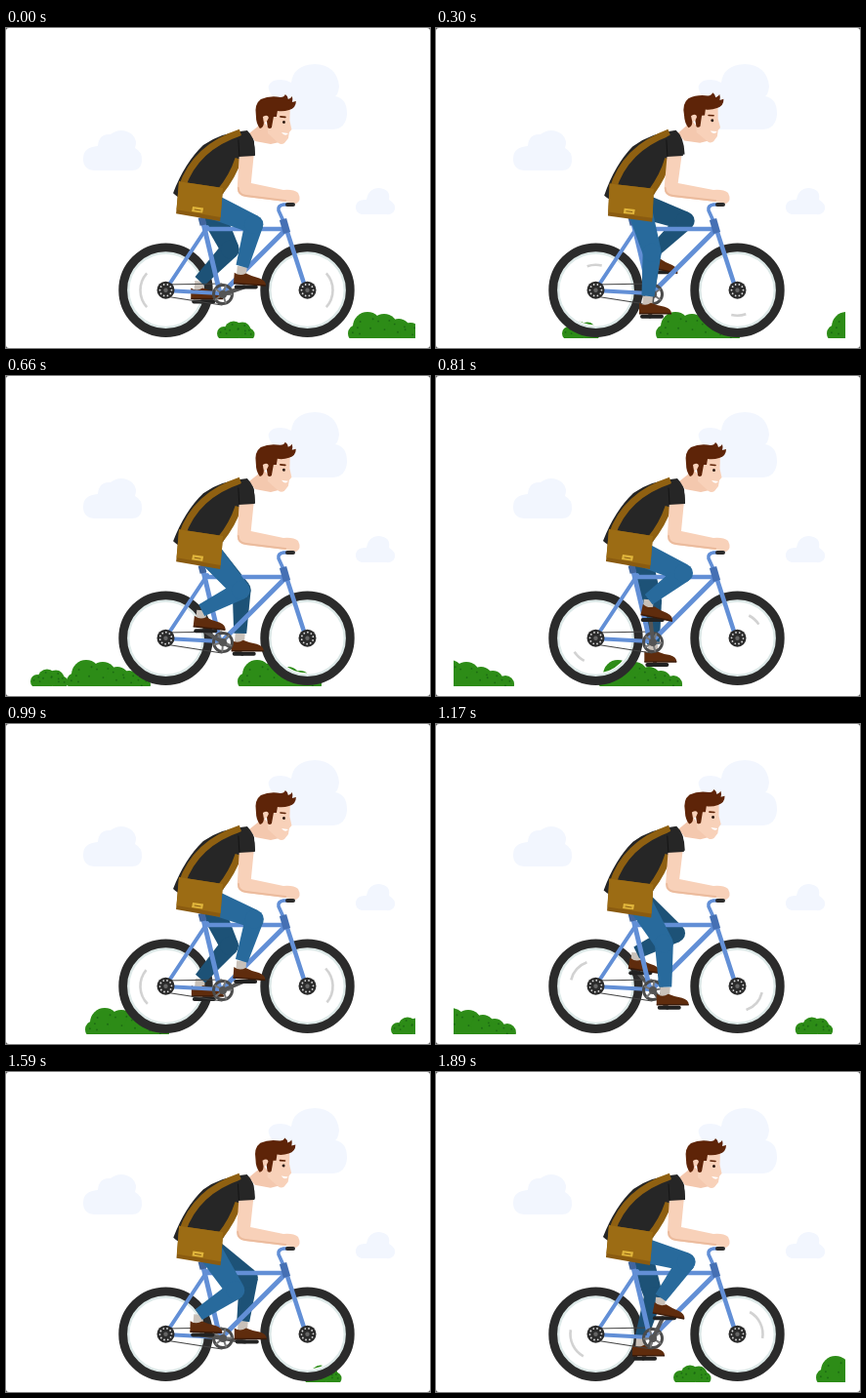
Animation, 434 px wide and 328 px high, one loop 1.92 s. Source, as an HTML page with a canvas:

```html
<!DOCTYPE html>
<html>
<head>
<meta charset="utf-8">
<style>
html, body { margin: 0; width: 434px; height: 328px; overflow: hidden; background: #555; }
canvas { display: block; }
</style>
</head>
<body>
<canvas id="stage" width="434" height="328"></canvas>
<script>
const g = document.getElementById('stage').getContext('2d');
const RAD = Math.PI / 180;
const LOOP = 1920, STEP = 30, TURN = 1000;
const HIP = [207, 181], CRANK = [222, 273], CRANK_LEN = 23;
const REAR = [163.5, 268.7], FRONT = [308.5, 268.7];
const BLUE = '#628fd6', DARK = '#2b2b2b', SKIN = '#f8d1b9', BROWN = '#8f6011';

function fill(d, color) {
  g.fillStyle = color;
  g.fill(new Path2D(d));
}

function line(d, color, width, cap = 'round') {
  g.strokeStyle = color;
  g.lineWidth = width;
  g.lineCap = cap;
  g.lineJoin = 'round';
  g.stroke(new Path2D(d));
}

function disc(x, y, r, color) {
  g.fillStyle = color;
  g.beginPath();
  g.arc(x, y, r, 0, 7);
  g.fill();
}

function ring(x, y, r, color, width, from = 0, to = 2 * Math.PI) {
  g.strokeStyle = color;
  g.lineWidth = width;
  g.lineCap = 'butt';
  g.beginPath();
  g.arc(x, y, r, from, to);
  g.stroke();
}

// Limb that narrows from radius ra to rb
function taper([ax, ay], ra, [bx, by], rb, color) {
  const a = Math.atan2(by - ay, bx - ax), nx = -Math.sin(a), ny = Math.cos(a);
  fill(`M${ax + nx * ra},${ay + ny * ra}L${bx + nx * rb},${by + ny * rb}
    L${bx - nx * rb},${by - ny * rb}L${ax - nx * ra},${ay - ny * ra}Z`, color);
  disc(ax, ay, ra, color);
}

// Piecewise path through [time, x] points, extended at both ends
function along(points, t) {
  let i = 1;
  while (i < points.length - 1 && t > points[i][0]) i++;
  const [t0, x0] = points[i - 1], [t1, x1] = points[i];
  return x0 + (x1 - x0) * (t - t0) / (t1 - t0);
}

function clouds() {
  const c = '#f2f6fe';
  fill('M284,104Q267,103 267,89Q267,78 277,74Q262,60 274,54Q284,51 292,56Q294,38 316,37Q339,38 341,60Q340,68 337,70Q349,72 349,88Q348,103 335,104Z', c);
  fill('M90,146Q79,145 79,134Q79,122 94,121Q95,108 107,109Q118,101 129,109Q135,115 132,123Q140,127 139,137Q138,146 129,146Z', c);
  fill('M364,191Q357,189 358,182Q360,175 369,176Q371,164 382,164Q394,165 392,176Q399,180 398,186Q396,192 389,191Z', c);
}

function bush(x, parts) {
  g.save();
  g.beginPath();
  g.rect(18, 280, 401, 38);
  g.clip();
  for (const [dx, y, r] of parts) disc(x + dx, y, r, '#2d8c17');
  for (const [dx, y, r] of parts)
    for (let k = 0; k < 3; k++)
      disc(x + dx + r * .5 * Math.cos(k * 2.2 + dx), y - r * .25 + r * .4 * Math.sin(k * 2.2 + dx), .9, '#1c6a14');
  g.restore();
}

const SMALL = [[7, 313, 7], [17, 310, 9.5], [26, 310, 8.5], [32, 314, 6.5]];
const LARGE = [[9, 313, 9], [20, 306, 15], [37, 307, 14], [52, 310, 12], [64, 313, 11], [77, 316, 9]];

function bushes(t) {
  const wrap = start => t < start ? t + 2000 : t;
  bush(along([[990, 394], [1380, 337], [1590, 305], [1890, 243], [2000, 216], [2300, 129], [2660, 25]], wrap(800)), SMALL);
  bush(along([[1890, 389], [2000, 350], [2300, 225], [2660, 62]], wrap(1300)), LARGE);
  bush(along([[300, 400], [660, 237], [990, 81]], t), LARGE);
}

function wheel([x, y], shine, phase) {
  ring(x, y, 37.8, '#fff', 4);
  ring(x, y, 38.3, '#dde9e8', 2.6);
  ring(x, y, 43.8, DARK, 8.8);
  const half = 42 * Math.min(1, Math.max(0, 1 - phase / 180, (phase - 270) / 60));
  const mid = shine + phase - 22 * Math.sin(phase * RAD);
  if (half) ring(x, y, 26, '#d2d2d2', 2.6, (mid - half) * RAD, (mid + half) * RAD);
}

function hub([x, y], phase) {
  disc(x, y, 9, DARK);
  for (let k = 0; k < 10; k++) {
    const a = (k * 36 + phase) * RAD;
    disc(x + 6 * Math.cos(a), y + 6 * Math.sin(a), .9, '#ddd');
  }
  disc(x, y, 2.2, '#666');
}

function pedalAt(angle) {
  return [CRANK[0] + CRANK_LEN * Math.cos(angle * RAD), CRANK[1] + CRANK_LEN * Math.sin(angle * RAD)];
}

function crankArm(angle) {
  const [x, y] = pedalAt(angle);
  line(`M${CRANK}L${x},${y}`, '#555', 4);
}

function leg(angle, color) {
  const [crankX, py] = pedalAt(angle);
  const px = crankX + 2;
  const ankle = [px - 4, py - 21];
  const thigh = 51, shin = 45;
  const dx = ankle[0] - HIP[0], dy = ankle[1] - HIP[1];
  const d = Math.min(Math.hypot(dx, dy), thigh + shin - .1);
  const bend = Math.acos((thigh * thigh + d * d - shin * shin) / (2 * thigh * d));
  const a = Math.atan2(dy, dx) - bend;
  const knee = [HIP[0] + thigh * Math.cos(a), HIP[1] + thigh * Math.sin(a)];

  line(`M${px - 10},${py}H${px + 10}`, '#222', 4);
  line(`M${ankle}L${px - 5},${py - 9}`, '#c9c1b9', 10, 'butt');
  g.save();
  g.translate(px, py);
  g.rotate(12 * Math.max(0, -Math.sin(angle * RAD)) * RAD);
  fill('M-13,-14Q-7,-10 -1,-14Q6,-11 13,-10Q20,-8 20,-3H-13Z', '#5f2c0d');
  line('M-13,-3H20', '#3a1a08', 1.5, 'butt');
  g.restore();
  taper(HIP, 13, knee, 9.5, color);
  taper(knee, 9.5, ankle, 6.5, color);
}

function frame(phase) {
  line('M163,263L221,262M163,275L221,284', '#444', 1.2);
  line('M201,196L219,272', BLUE, 5);
  line('M206,204L163,269L219,272', BLUE, 4);
  line('M205,206H286', BLUE, 4.5);
  line('M284,209L221,272', BLUE, 5);
  line('M285,200L307,268', BLUE, 4.5);
  line('M284,198L279,187Q278,182 284,181H290', BLUE, 3.6);
  line('M283.5,196L287.5,210', '#4570b4', 7.5, 'butt');
  line('M200,194L202,202', '#41659e', 7, 'butt');
  hub(REAR, phase);
  hub(FRONT, phase);
}

function chainring(phase) {
  const [x, y] = CRANK;
  ring(x, y, 9.5, '#4b4b4b', 3);
  for (let k = 0; k < 5; k++) {
    const a = (k * 72 + phase) * RAD;
    line(`M${x},${y}L${x + 9 * Math.cos(a)},${y + 9 * Math.sin(a)}`, '#777', 2);
  }
  disc(x, y, 4, '#555');
}

function head() {
  fill('M249,108L264,96L280,117L271,119L255,116Z', '#f4c8ae');
  fill('M267,80L291,80L290.5,95L292.5,104L290,107L289,113L285,118Q282,120 279,118L268,108Z', SKIN);
  fill('M256,90Q254,78 261,73Q270,69 281,71Q285,71 286,68Q289,70 289,73Q292,72 293,70Q294,73 293,76L297,75Q297,82 290,84Q284,86 278,85L277,91L274,91L272,102Q270,104 268,102L267,95L264,97Q264,102 260,103Q256,98 256,90Z', '#5e2408');
  fill('M264,97L263,91Q268,88 269,92L267,96Z', SKIN);
  line('M281,91L286,91.5', '#5e2408', 1.6);
  disc(284.5, 96.5, 1.5, '#2c1a12');
  fill('M282,107L289,108Q286,112 282,107Z', '#fff');
}

function body(bob) {
  g.save();
  g.translate(215, 140 + bob);
  g.rotate(-2.3 * bob * RAD);
  g.translate(-215, -140);
  head();
  fill('M247,105Q220,107 202,120Q183,138 171,169Q176,174 186,178L222,170L237,138L243,131L255,130Q255,112 247,105Z', '#262626');
  line('M180,163Q194,122 240,107', BROWN, 7, 'butt');
  line('M238,134Q232,152 219,168', BROWN, 7, 'butt');
  fill('M177,157L222,164L219,198L174,190Z', '#8a5b10');
  fill('M177,157L222,164L219.5,194L174.5,186Z', '#9c6c14');
  fill('M191,183L202,184.5L201,189.5L190,188Z', '#e0b53b');
  line('M193,186L199,187', '#8b5d12', 1);
  g.restore();
}

function arm(bob) {
  const s = -2.2 * bob, e = -3.4 * bob;
  fill(`M${239 + s},128L${254 + s},128L${251 + e},159L284,166Q294,165 299,169Q303,177 297,180L286,178
    L${245 + e},173Q${237 + e},172 ${237 + e},163Z`, SKIN);
  line(`M${238 + e},164Q${238 + e},171 ${246 + e},172L286,177`, '#ebbb9d', 2);
  fill(`M${238 + s},112Q${250 + s},104 ${254 + s},116L${255 + s},131L${238 + s},132Z`, '#262626');
  line(`M${238 + s},115L${239 + s},131`, '#151515', 1);
  line('M288,181H294', DARK, 4);
}

function draw(t) {
  const phase = t % TURN / TURN * 360;
  const near = phase - 19 + 9 * Math.sin(phase * RAD);
  const bob = ((1 + Math.cos((t - 340) / TURN * 2 * Math.PI)) / 2) ** 2;
  g.clearRect(0, 0, 434, 328);
  g.fillStyle = '#fff';
  g.beginPath();
  g.roundRect(0, 0, 434, 328, 3);
  g.fill();
  clouds();
  bushes(t);
  wheel(REAR, 180, phase);
  wheel(FRONT, 0, phase);
  crankArm(near + 180);
  leg(near + 180, '#1d5277');
  frame(phase);
  chainring(phase);
  crankArm(near);
  leg(near, '#286a9c');
  body(bob);
  arm(bob);
}

function tick(now) {
  draw(Math.floor(now % LOOP / STEP) * STEP);
  requestAnimationFrame(tick);
}
draw(0);
requestAnimationFrame(tick);
</script>
</body>
</html>
```
